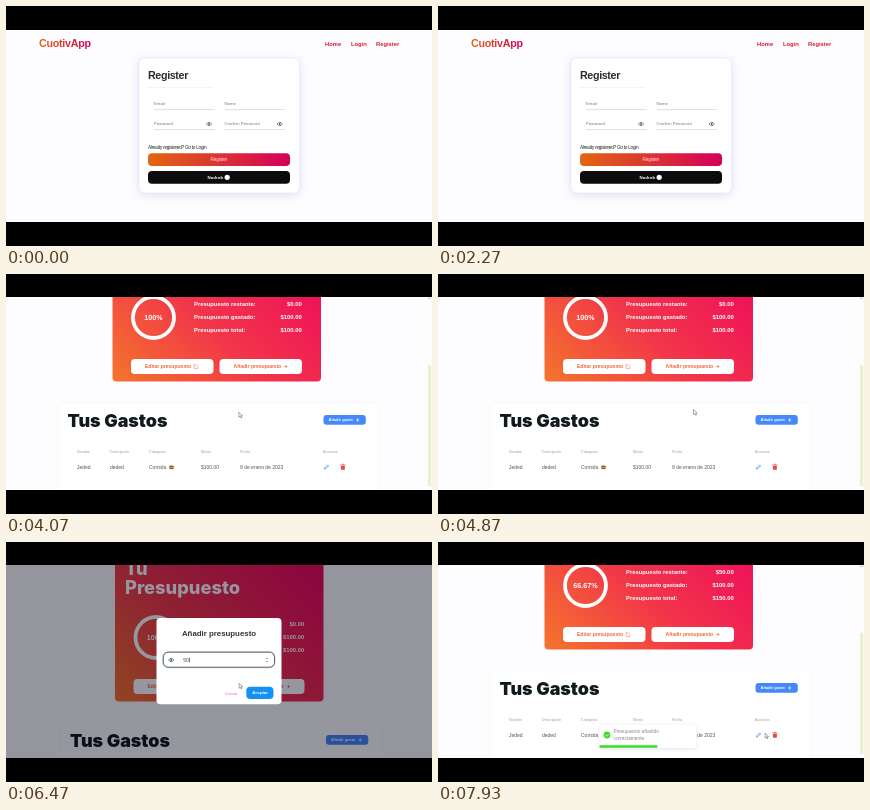
Recreate the animation shown at these times as an HTML page. Size 426 px wide and 240 px high, loop 8000 ms.

```html
<!DOCTYPE html>
<html lang="es">
<head>
<meta charset="utf-8">
<title>Presupuesto</title>
<style>
html, body { margin: 0; width: 100%; height: 100%; overflow: hidden; background: #000; }
svg { display: block; width: 100vw; height: 100vh; }
text { font-family: "Liberation Sans", Arial, sans-serif; white-space: pre; }
.heavy { font-family: Inter, sans-serif; }
.glow { filter: drop-shadow(0 2px 5px rgba(110, 100, 190, .2)); }
.soft { filter: drop-shadow(0 1px 2px rgba(0, 0, 0, .1)); }
</style>
</head>
<body>
<svg id="stage" viewBox="0 0 426 240" xmlns="http://www.w3.org/2000/svg">
  <defs>
    <linearGradient id="brand"><stop stop-color="#e2660f"/><stop offset="1" stop-color="#d4005a"/></linearGradient>
    <linearGradient id="warm" gradientUnits="userSpaceOnUse" x1="115" y1="118" x2="275" y2="-42">
      <stop stop-color="#f4762c"/><stop offset=".5" stop-color="#f2344a"/><stop offset="1" stop-color="#ee0c5c"/>
    </linearGradient>
    <clipPath id="view"><rect y="23" width="426" height="193"/></clipPath>
  </defs>
  <rect width="426" height="240"/>
  <g id="register"></g>
  <g id="app" clip-path="url(#view)">
    <rect y="22" width="426" height="194" fill="#fdfdff"/>
    <g id="page"></g>
    <rect id="shade" y="22" width="426" height="194" fill="#000014"/>
    <g id="bar"></g>
    <g id="modal"></g>
    <g id="toast"></g>
    <g id="pointer"></g>
  </g>
</svg>
<script>
const LOOP = 8000;
const $ = id => document.getElementById(id);

const rect = (x, y, w, h, fill, r = 0, more = '') =>
  `<rect x="${x}" y="${y}" width="${w}" height="${h}" rx="${r}" fill="${fill}" ${more}/>`;
const text = (x, y, size, str, fill, more = '') =>
  `<text x="${x}" y="${y}" font-size="${size}" fill="${fill}" ${more}>${str}</text>`;
const path = (d, stroke, w = .7, more = '') =>
  `<path d="${d}" fill="none" stroke="${stroke}" stroke-width="${w}" ${more}/>`;
const circle = (x, y, r, fill, more = '') =>
  `<circle cx="${x}" cy="${y}" r="${r}" fill="${fill}" ${more}/>`;
const plus = (x, y, r, c) => path(`M${x - r} ${y}h${2 * r}M${x} ${y - r}v${2 * r}`, c);
const eye = (x, y, c) =>
  path(`M${x - 2.6} ${y}q2.6 -3.6 5.2 0q-2.6 3.6 -5.2 0z`, c, .7) + circle(x, y, .9, c);
const BOLD = 'font-weight="700"', MID = 'text-anchor="middle"', END = 'text-anchor="end"';
const heavy = (x, y, size, weight, str, c) =>
  text(x, y, size, str, c, `class="heavy" font-weight="${weight}"`);

function buildRegister() {
  const field = (x, y, label) =>
    text(x, y, 4.3, label, '#777') + path(`M${x} ${y + 4.2}h60.5`, '#c9c9d4', .6);
  const nav = [[319, 'Home'], [345, 'Login'], [370, 'Register']];
  return rect(0, 24, 426, 192, '#fdfdff') +
    text(33, 41.4, 10.7, 'CuotivApp', 'url(#brand)', BOLD + ' letter-spacing="-.25"') +
    nav.map(([x, s]) => text(x, 40, 5.8, s, '#dc1f35', BOLD)).join('') +
    rect(133, 52, 160.5, 135, '#fff', 6, 'stroke="#e4e2f2" stroke-width=".6" class="glow"') +
    text(142, 73.3, 10.7, 'Register', '#2b2b2f', BOLD + ' letter-spacing="-.35"') +
    path('M142 81.5h64', '#eeeef3', .6) +
    field(148, 99.4, 'Email') + field(218.5, 99.4, 'Name') +
    field(148, 119.4, 'Password') + field(218.5, 119.4, 'Confirm Password') +
    eye(203, 118, '#555') + eye(273.7, 118, '#555') +
    text(142, 143, 4.7, 'Already registered? Go to Login', '#222', 'letter-spacing="-.25"') +
    rect(142, 147.3, 142, 12.7, 'url(#brand)', 4) +
    text(213, 155.2, 4.5, 'Register', '#ffe9ee', MID) +
    rect(142, 165, 142, 12.8, '#0c0c0e', 4) +
    text(201.5, 173, 4.4, 'Nodrub', '#fff', BOLD) + circle(221.2, 171.3, 2.6, '#fff');
}

function buildPage() {
  const line = (y, label, id) =>
    text(188, y, 5.85, label, '#fff', BOLD) + text(295.7, y, 5.9, '', '#fff', `${BOLD} ${END} id="${id}"`);
  const button = (x, label) =>
    rect(x, 85, 82.5, 15, '#fff', 4) + text(x + 14, 94.2, 5.05, label, '#f2683a', BOLD);
  const cols = [[71, 'Nombre', 'Jeded'], [104, 'Descripción', 'deded'], [143, 'Categoría', 'Comida'],
    [195, 'Monto', '$100.00'], [234, 'Fecha', '9 de enero de 2023'], [317, 'Acciones', '']];
  return rect(106.5, -46, 208.5, 153.6, 'url(#warm)', 4) +
    heavy(116.5, -19.5, 18.3, 800, 'Tu', '#fff') + heavy(116.5, -.4, 18.3, 800, 'Presupuesto', '#fff') +
    circle(147.5, 43.5, 20.5, 'none', 'stroke="#fff" stroke-width="3.8"') +
    text(147.5, 45.7, 7.2, '', '#fff', `${BOLD} ${MID} id="pct"`) +
    line(32, 'Presupuesto restante:', 'left') + line(45.2, 'Presupuesto gastado:', 'spent') +
    line(58.4, 'Presupuesto total:', 'total') +
    button(125, 'Editar presupuesto') + button(213.5, 'Añadir presupuesto') +
    path('M190 90.6h-1.8v3.8h3.8v-1.8M190 92.6l2.2-2.2', '#f2683a', .5) + plus(280, 92.5, 1.5, '#f2683a') +
    rect(52, 128.5, 321, 140, '#fff', 4, 'stroke="#f8f8fb" stroke-width=".8"') +
    heavy(61.5, 152.8, 17.9, 900, 'Tus Gastos', '#101a1c') +
    rect(317.5, 141, 42.3, 9.8, '#4488fa', 3) +
    text(322.5, 147.4, 4, 'Añadir gasto', '#fff', BOLD) + plus(351.7, 146, 1.6, '#fff') +
    cols.map(([x, head, cell]) =>
      text(x, 178.8, 3.7, head, '#9a9aa4') + text(x, 195, 5, cell, '#555')).join('') +
    rect(163, 191.4, 5, 3.8, '#a0552c', 1.6) + path('M163 193.4h5', '#e8c040', .7) +
    path('M318.4 195.2l.4 -1.5l2.8 -2.8l1 1l-2.8 2.8z', '#4a9ae8', .8) +
    rect(334.9, 192, 4, 3.8, '#e04848', .7) + path('M334.2 191.1h5.4M336 190.3h1.8', '#e04848', .8);
}

function buildModal() {
  return rect(150.5, 76, 125, 86.3, '#fff', 4) +
    text(213, 94, 7.85, 'Añadir presupuesto', '#333', `${BOLD} ${MID}`) +
    rect(157.3, 110.2, 111.2, 15, '#fff', 5, 'stroke="#c2d4de" stroke-width="2"') +
    rect(157.3, 110.2, 111.2, 15, '#fff', 5, 'stroke="#4a5560" stroke-width=".9"') +
    eye(165.2, 118, '#444') +
    text(177.3, 119.8, 5, '', '#444', 'id="amount"') + path('M0 115.6v5', '#333', .6, 'id="caret"') +
    path('M259.6 117.2l1.2-1.4l1.2 1.4M259.6 118.8l1.2 1.4l1.2-1.4', '#666', .6) +
    text(219, 152.5, 4.4, 'Cerrar', '#e45ccf') +
    rect(240.3, 144.7, 27.2, 12.2, '#1591f4', 4) + text(254, 152.4, 4.2, 'Aceptar', '#fff', `${BOLD} ${MID}`);
}

function buildToast() {
  return rect(161.5, 183, 96.5, 23, '#fff', 1.5, 'class="soft"') +
    circle(169, 193, 3.4, '#3fdc2e') + path('M167.4 193l1.2 1.2l2.1-2.3', '#fff', .7) +
    text(175.5, 191, 4.8, 'Presupuesto añadido', '#888') + text(175.5, 197.8, 4.8, 'correctamente', '#888') +
    rect(161.5, 203.2, 96.5, 2.6, '#3fdc2e', 0, 'id="progress"');
}

const CURSORS = {
  arrow: '<path d="M0 0v5l1.2-1.1l.9 1.8l.9-.4l-.9-1.8h1.5z" fill="#fff" stroke="#555" stroke-width=".5"/>',
  beam: path('M-1.2 -3h2.4M0 -3v6M-1.2 3h2.4', '#222', .7),
  hand: '<path d="M-.8 -2.5q.7 -.8 1.3 0v2l2 .6q.6 .3 .4 1.2l-.6 2.2h-3l-2 -2.4q.1 -.9 1 -.4l.9 .6z" fill="#fff" stroke="#222" stroke-width=".3"/>'
};

$('register').innerHTML = buildRegister();
$('page').innerHTML = buildPage();
$('modal').innerHTML = buildModal();
$('toast').innerHTML = buildToast();
$('bar').innerHTML = rect(421, 22, 5, 194, '#fcfcfc') +
  rect(422, 0, 3.2, 121, '#efefcd', 0, 'id="thumb"') + path('M422.4 25l1.1 -1.2l1.1 1.2', '#888', .6);
$('pointer').innerHTML = Object.entries(CURSORS).map(([k, s]) => `<g id="${k}">${s}</g>`).join('');

const ramp = (t, a, b) => Math.min(1, Math.max(0, (t - a) / (b - a)));
const ease = p => p * p * (3 - 2 * p);
const set = (id, key, value) => $(id).setAttribute(key, value);
const show = (id, on) => set(id, 'display', on ? 'inline' : 'none');
const write = (id, str) => { if ($(id).textContent !== str) $(id).textContent = str; };

// time, x, y of the pointer
const TRACK = [[2670, 198, 142.5], [3500, 198, 142.5], [4500, 255.5, 135.5], [4950, 255.5, 135.5],
  [5300, 252, 145], [5500, 252, 145], [5800, 208.5, 126.5], [6250, 208.5, 126.5],
  [6650, 251, 152], [7200, 251, 152], [7800, 327, 191]];

function pointerAt(t) {
  let i = 0;
  while (i < TRACK.length - 2 && t > TRACK[i + 1][0]) i++;
  const [a, x, y] = TRACK[i], [b, u, v] = TRACK[i + 1], p = ease(ramp(t, a, b));
  return [x + (u - x) * p, y + (v - y) * p];
}

function draw(t) {
  const inApp = t >= 2670;
  show('register', !inApp);
  show('app', inApp);
  if (!inApp) return;

  const up = ease(ramp(t, 5000, 5300)) - ease(ramp(t, 7270, 7650));
  const locked = t >= 5500 && t < 7000;
  set('page', 'transform', `translate(${locked ? 2.5 : 0} ${52 * up})`);
  show('bar', !locked);
  set('thumb', 'y', 91 - 33 * up);

  const paid = t >= 6800;
  write('pct', paid ? '66.67%' : '100%');
  write('left', paid ? '$50.00' : '$0.00');
  write('spent', '$100.00');
  write('total', paid ? '$150.00' : '$100.00');

  set('shade', 'opacity', .41 * (ramp(t, 5500, 5650) - ramp(t, 7100, 7240)));
  const open = ease(ramp(t, 5500, 5680)) - ease(ramp(t, 6850, 7000));
  const k = .8 + .2 * open;
  show('modal', open > 0);
  set('modal', 'opacity', open);
  set('modal', 'transform', `translate(213 119) scale(${k}) translate(-213 -119)`);
  const typed = t < 5820 ? '' : t < 6050 ? '5' : '50';
  write('amount', typed);
  set('caret', 'transform', `translate(${178 + 2.78 * typed.length} 0)`);

  const rise = ease(ramp(t, 7130, 7400));
  show('toast', rise > 0);
  set('toast', 'transform', `translate(0 ${34 * (1 - rise)})`);
  set('progress', 'width', 96.5 * (1 - ramp(t, 7130, 9130)));

  const [x, y] = pointerAt(t);
  const kind = t >= 5700 && t < 6380 ? 'beam'
    : (t >= 5200 && t < 5600) || (t >= 6550 && t < 7270) ? 'hand' : 'arrow';
  for (const c in CURSORS) show(c, c === kind);
  set('pointer', 'transform', `translate(${x} ${y})`);
}

const start = performance.now();
function tick() {
  draw((performance.now() - start) % LOOP);
  requestAnimationFrame(tick);
}
tick();
</script>
</body>
</html>
```
